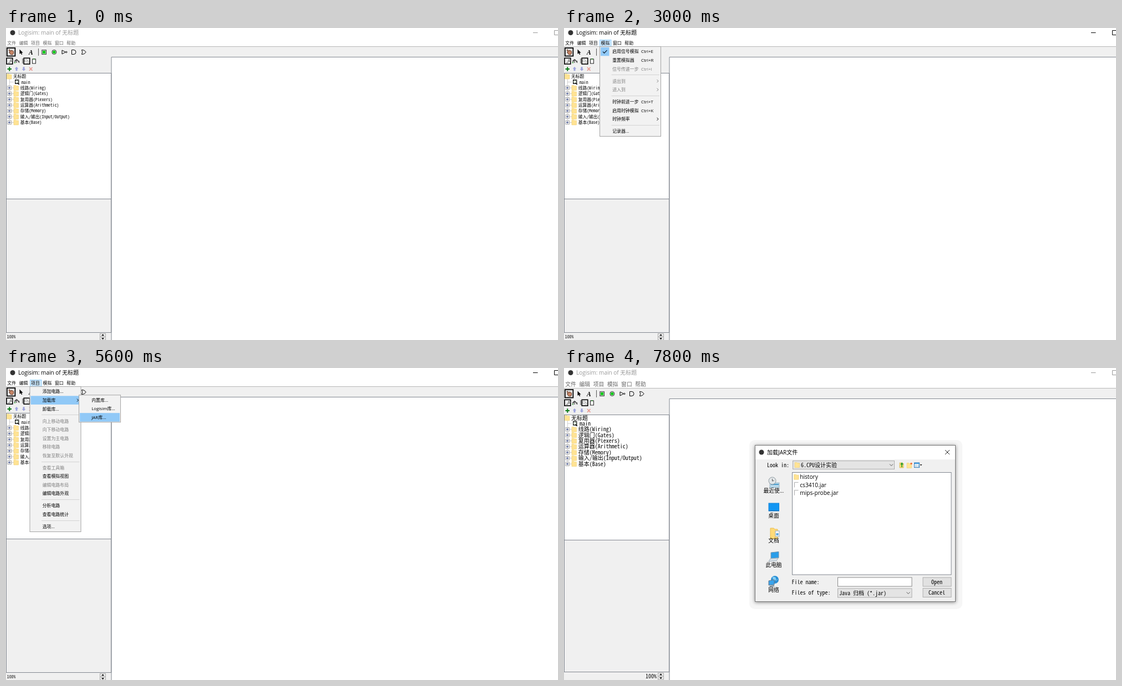
These frames come from a looping animation (995 by 563 pixels, 8000 ms). An HTML page:

```html
<!DOCTYPE html>
<html lang="zh-CN">
<head>
<meta charset="utf-8">
<title>Logisim</title>
<style>
  html, body { margin: 0; width: 100%; height: 100%; overflow: hidden; background: #fff; }
  svg { display: block; width: 100vw; height: 100vh; }
  text { font-family: 'Open Sans', 'Noto Sans CJK SC', 'Noto Sans CJK', sans-serif; white-space: pre; }
  .mono { font-family: 'Noto Sans Mono CJK SC', 'Noto Sans CJK SC', 'Noto Sans CJK', monospace; }
</style>
</head>
<body>
<svg id="stage" viewBox="0 0 995 563" preserveAspectRatio="none"></svg>
<script>
const stage = document.getElementById('stage');
const LOOP = 8000, BLUE = '#91c9f7', FACE = '#f0f0f0', EDGE = '#828790';

// Drawing helpers; text is placed by its vertical centre
const rect = (x, y, w, h, fill, stroke = 'none', more = '') =>
  `<rect x="${x}" y="${y}" width="${w}" height="${h}" fill="${fill}" stroke="${stroke}" ${more}/>`;
const path = (d, stroke = '#000', fill = 'none', width = 1) =>
  `<path d="${d}" stroke="${stroke}" fill="${fill}" stroke-width="${width}"/>`;
const disc = (x, y, r, fill, stroke = 'none') =>
  `<circle cx="${x}" cy="${y}" r="${r}" fill="${fill}" stroke="${stroke}"/>`;
const text = (x, y, str, size, fill = '#000', more = '') =>
  `<text x="${x}" y="${y + size * 0.36}" font-size="${size}" fill="${fill}" ${more}>${str}</text>`;
const mono = (x, y, str, size, more = '') => text(x, y, str, size, '#000', 'class="mono" ' + more);
const group = (transform, body, more = '') => `<g transform="${transform}" ${more}>${body}</g>`;
const folder = (x, y) =>
  path(`M${x} ${y - 4.5}h4l1 1h3.5v8h-8.5z`, '#efcf70', '#ffe394', 0.6);

// Menu entries: '-' separator, leading '!' disabled, trailing '>' submenu, '|' shortcut
const MENUS = {
  simulate: { x: 64.5, y: 33.5, w: 110, keys: 139, mark: 'check', items:
    ['启用信号模拟|Ctrl+E', '重置模拟器|Ctrl+R', '!信号传递一步|Ctrl+I', '-', '!退出到>', '!进入到>', '-',
     '时钟前进一步|Ctrl+T', '启用时钟模拟|Ctrl+K', '时钟频率>', '-', '记录器...'] },
  window: { x: 85.5, y: 33.5, w: 149, keys: 201, mark: 'dot', items:
    ['最小化|Ctrl+M', '最大化', '关闭|Ctrl+W', '-', 'Combinational Analysis', '偏好', '-', '无标题'] },
  project: { x: 43, y: 33.5, w: 92, items:
    ['添加电路...', '加载库>', '卸载库...', '-', '!向上移动电路', '!向下移动电路', '!设置为主电路', '!移除电路',
     '!恢复至默认外观', '-', '!查看工具箱', '查看模拟视图', '!编辑电路布局', '编辑电路外观', '-',
     '分析电路', '查看电路统计', '-', '选项...'] },
  library: { x: 131.5, y: 48.8, w: 75, items: ['内置库...', 'Logisim库...', 'JAR库...'] }
};
const BAR = ['文件', '编辑', '项目', '模拟', '窗口', '帮助'];
const BAR_INDEX = { project: 2, simulate: 3, window: 4 };

// State changes: start time, then properties
const STATES = [
  [0, {}],
  [1200, { menu: 'simulate' }],
  [1800, { menu: 'simulate', hover: 1 }],
  [2000, { menu: 'simulate' }],
  [2200, { menu: 'window' }],
  [3000, { menu: 'simulate' }],
  [3200, { menu: 'project' }],
  [3800, { menu: 'project', hover: 1 }],
  [4000, { menu: 'project', hover: 1, sub: true }],
  [4400, { menu: 'project' }],
  [4800, { menu: 'project', hover: 1 }],
  [5000, { menu: 'project', hover: 1, sub: true, subHover: 0 }],
  [5400, { menu: 'project', hover: 1, sub: true, subHover: 1 }],
  [5600, { menu: 'project', hover: 1, sub: true, subHover: 2 }],
  [7000, { dialog: true, scale: 0.98, halo: 0.98, alpha: 0.55 }],
  [7200, { dialog: true, scale: 1, halo: 0.98, alpha: 1 }],
  [7600, { dialog: true, scale: 1, halo: 1, alpha: 1, bigMain: true }],
  [7800, { dialog: true, scale: 1, halo: 1, alpha: 1, bigMain: true, bigDialog: true }]
];

function drawMenu(name, hover) {
  const { x, y, w, keys, mark, items } = MENUS[name];
  const ROW = 15.55, GAP = 6.45;
  let top = y + 1.3, out = '', last = top;
  items.forEach((item, i) => {
    if (item === '-') {
      out += path(`M${x + 21} ${Math.round(top + 3)}.5H${x + w - 2.5}`, '#d4d4d4');
      top += GAP;
      return;
    }
    const mid = top + ROW / 2;
    const color = item[0] === '!' ? '#808080' : '#000';
    const [label, key] = item.replace(/[!>]/g, '').split('|');
    if (i === hover) out += rect(x + 1.5, top, w - 3, ROW, BLUE);
    out += text(x + 22.7, mid, label, 7.9, color);
    if (key) out += text(keys, mid, key, 7.9, color);
    if (item.endsWith('>')) out += path(`M${x + w - 7} ${mid - 2.5}l2.5 2.5l-2.5 2.5`, color);
    if (mark === 'check' && i === 0)
      out += rect(x + 1.5, top, 15.5, ROW, BLUE) + path(`M${x + 5.5} ${mid}l2.5 2.7l5-5.2`, '#123', 'none', 1.2);
    if (mark === 'dot' && i === items.length - 1)
      out += rect(x + 2, top, 15.5, ROW, BLUE) + disc(x + 9.7, mid, 2.4, '#123');
    last = top += ROW;
  });
  return rect(x, y, w, Math.round(last - y + 1.2), '#f2f2f2', '#a5a5a5') + out;
}

function drawTitle(active) {
  const color = active ? '#000' : '#999';
  return rect(0, 0, 995, 37, '#fff') + disc(12, 8.5, 4.5, '#333') +
    text(22, 8.5, 'Logisim: main of 无标题', 10, color) +
    path('M950 8.5h8.5M988.5 4.5h8v8h-8z', color);
}

function drawBar(active, menu, big) {
  const step = big ? 25.2 : 21.4, open = BAR_INDEX[menu];
  let out = '';
  if (open) out += rect(Math.round(open * step) + 0.5, 21.5, 20.5, 12, '#cce8ff', '#99d1ff');
  BAR.forEach((label, i) => {
    out += text(2.3 + i * step, big ? 29 : 27, label, big ? 9.8 : 7.9, active ? '#000' : '#666');
  });
  return out;
}

function drawToolbar() {
  const ink = '#000';
  const wrench = 'M3.5 64l4-4q-1-3 2.5-4l-1 2l1 1l2-.7q-.5 3-3.5 2.5l-4 4z';
  return rect(1.8, 36, 14.6, 14.6, '#e4e4e4', ink, 'stroke-width="1.8"') +
    path('M5 39.5l1.4-.6l2.6 3l.3-1.7l1.3.2l.6.4l1.2.3l1.2 1.2v3.4l-1.5 2.2h-3.4l-3.2-4.2l1.7-.2z', '#59301e', '#c98768', 0.9) +
    path('M24.5 38.5v8.5l2-1.8l1.5 3l1.3-.7l-1.4-2.8h2.7z', 'none', ink) +
    text(41, 43.5, 'A', 11.5, ink, 'style="font:italic bold 11.5px \'Liberation Serif\',serif"') +
    path('M58.5 37v13', '#555') +
    rect(64.8, 39.8, 7.6, 7.6, '#fff', '#222') + rect(66, 41, 5.2, 5.2, '#10c818') +
    disc(86.8, 43.5, 4, '#fff', '#222') + disc(86.8, 43.5, 2.8, '#10c818') +
    path('M101 40v7l6.5-3.5z') + disc(108.8, 43.5, 1.2, '#fff', ink) +
    path('M118.5 39.5h3.5a4 4 0 0 1 0 8h-3.5z') +
    path('M136.5 39.5q5-.2 7.5 4q-2.5 4.2-7.5 4q2.5-4 0-8z') +
    rect(1, 54.3, 10.8, 10.8, '#eee', ink, 'stroke-width="1.6"') + path(wrench, '#666', '#bbb', 0.6) +
    path('M15 63l3-5h3l3 5M15 60l4-3.5l3 2.5M19 58v5', '#222') +
    disc(16, 62.5, 1.2, '#5a5') + disc(23, 60.5, 1.4, '#555') +
    path('M30 55v9', '#444') +
    rect(32.2, 54.3, 10.6, 10.8, '#eee', ink, 'stroke-width="1.6"') +
    path('M34 57h2.5a2 2 0 0 1 0 4h-2.5zM38.5 59q2 0 2.5 2t-2.5 2', '#aaa') +
    rect(47.5, 56, 6, 8, '#fff', '#222') + path('M49 56h3', '#080') +
    path('M2.5 74h7.5M6.3 70.3v7.5', '#087a16', 'none', 2) +
    path('M19 70l3.3 3.6h-1.8v3.7h-3v-3.7h-1.8z', 'none', '#9da3df') +
    path('M32 77.5l3.3-3.6h-1.8v-3.7h-3v3.7h-1.8z', 'none', '#9da3df') +
    path('M42 71l5.5 5.8M47.5 71l-5.5 5.8', '#e99b93', 'none', 1.7);
}

function drawTree(size) {
  const rows = ['线路(Wiring)', '逻辑门(Gates)', '复用器(Plexers)', '运算器(Arithmetic)',
    '存储(Memory)', '输入/输出(Input/Output)', '基本(Base)'];
  let out = path('M6.5 92v78M6 97.5h8', '#c4c4c4', 'none', 0.8) +
    folder(1.5, 87.5) + mono(13, 87.5, '无标题', size) +
    rect(16.5, 93.5, 6.5, 7, '#fff', '#222') + disc(19.5, 97, 3, '#eafaea', '#222') +
    path('M21 99.5l2.7 2.5', '#000', 'none', 1.6) + mono(28, 98, 'main', size);
  rows.forEach((label, i) => {
    const y = 108 + i * 10.4;
    out += path(`M10 ${y}h4`, '#c4c4c4') + rect(2.8, y - 3.3, 6.6, 6.6, '#f8f8f8', '#919191', 'stroke-width=".8"') +
      path(`M4 ${y}h4.2M6.1 ${y - 2.1}v4.2`, '#3b4b87') + folder(14, y) + mono(25.7, y, label, size);
  });
  return out;
}

function drawMain(s) {
  const big = s.bigMain, active = !!s.menu, dy = big ? 3 : 0, size = big ? 10 : 7.75;
  const split = big ? 310.5 : 308.5, foot = big ? 548.5 : 549.5;
  return rect(0, 0, 995, 563, '#fff') + drawTitle(active) +
    rect(0, 33.5 + dy, 995, 19 + dy / 10, FACE) + rect(0, 52 + dy, 190, 511, FACE) +
    path(`M0 ${33.5 + dy}H995`, '#b8b8b8') + path(`M190 ${52.5 + dy}H995M190 ${52.5 + dy}V563`, EDGE) +
    drawBar(active, s.menu, big) + group(`translate(0 ${dy})`, drawToolbar()) +
    rect(0.5, 81.5 + dy, 189, split - 81.5 - dy, '#fff', EDGE) +
    group(`translate(0 ${big ? 2.7 : 0})`, drawTree(size)) +
    path(`M0 ${split}H190`, '#666b73') + rect(0.5, split, 189, foot - split, FACE, EDGE) +
    mono(big ? 147 : 1.8, foot + 8, '100%', size) +
    rect(169.5, foot + 2, 10, 11.5, FACE, '#999', 'stroke-width=".8"') +
    path(`M169.5 ${foot + 7.7}h10`, '#999') +
    path(`M171.8 ${foot + 5.8}l2.7-2.7l2.7 2.7zM171.8 ${foot + 9.8}l2.7 2.7l2.7-2.7z`, 'none', '#000');
}

function sideIcons() {
  const sheet = (x, y) => rect(x, y, 7, 10, '#f8fbff', '#9ab') + rect(x + 1.5, y + 4, 4, 4, '#5ba8e2');
  return rect(371, 207, 17, 9, '#b8d8ea', '#8ba7b8', 'stroke-width=".7"') + path('M373 210h14', '#4c9ccc', 'none', 2) +
    disc(375.5, 203.5, 6.5, '#e2e6e8', '#909ca3') + path('M375.5 200v4l3-1', '#555') +
    rect(369, 244, 18.5, 14, '#1296f3', '#1685d7') + path('M369 257.5h18.5', '#0b67b4') +
    path('M372 289h6l2 2h5v17h-13z', '#e7bd52', '#ffda78') + sheet(381, 294) +
    path('M373 333l14-1.5v11l-14 1z', '#7796ad', '#299de9') + path('M372 344l14-1l-3 5l-14 1z', '#a5b3bd', '#d7e0e7') +
    disc(380, 382, 7, '#298fd6') + path('M376 377l5 1l1 4l-4 2zM382 384l3-3', '#85cef3', '#85cef3') +
    path('M369 384l10-2v9l-10 1z', '#678', '#3aa4ec') + path('M371 394l8-1', '#78909e', 'none', 2);
}

function drawDialog(s) {
  const big = s.bigDialog, size = big ? 10 : 7.7, fileSize = big ? 10.1 : 8.2;
  const middle = 'text-anchor="middle"';
  const fieldX = big ? 493.5 : 475.5, fieldW = 627 - fieldX;
  const rowA = big ? 386 : 388.5, rowB = big ? 406 : 407;
  const height = big ? 16 : 13.5;
  const box = (x, y, w, h, fill, stroke = '#adadad') => rect(x, y, w, h, fill, stroke);
  const chevron = (x, y) => path(`M${x - 3} ${y - 1.5}l3 3l3-3`, '#555');
  const button = (label, y, stroke) =>
    box(647, y - height / 2, 51, height, '#e1e1e1', stroke) + mono(672, y, label, size, middle);

  let out = rect(344.5, 139.5, 361, 282, FACE, '#777', 'style="filter:drop-shadow(0 1px 3px #0007)"') +
    rect(345, 140, 360, 25, '#fff') + disc(356, 152, 4.5, '#333') +
    text(366, 152, '加载JAR文件', 10) + path('M687 148l8 8M695 148l-8 8', '#222') +
    mono(406, 175, 'Look in:', size, 'text-anchor="end"') +
    box(412.5, 167.5, 183, 15, '#e4e4e4') + folder(416, 175) +
    mono(427, 175, '6.CPU设计实验', size) + chevron(590, 175) +
    path('M605 171h4l1 1h2v8h-7z', '#d2ac41', '#ffdc76', 0.7) + path('M609 179v-7l-2 2m2-2l2 2', '#189b28', 'none', 1.6) +
    folder(618, 176) + disc(626, 172.5, 1.7, '#f26b32') +
    rect(631.5, 171, 9, 8.5, '#fff', '#2676b5') + path('M632 172h8.5', '#3794d9', 'none', 2) +
    path('M633.5 175h2m2 0h2m-6 2.5h2m2 0h2', '#367fae') + path('M641.5 174h4l-2 2.2z', 'none', '#111') +
    box(411.5, 188.5, 286.5, big ? 184.5 : 188, '#fff', EDGE);

  ['history', 'cs3410.jar', 'mips-probe.jar'].forEach((name, i) => {
    const y = (big ? 196.7 : 194.2) + i * (big ? 14.2 : 12.2);
    out += i ? path(`M415.5 ${y + 4.5}v-9h7`, '#999', '#fff', 0.8) : folder(414.5, y);
    out += text(425.3, y, name, fileSize);
  });
  out += sideIcons();
  [big ? '最近使...' : '最近使用...', '桌面', '文档', '此电脑', '网络'].forEach((label, i) => {
    out += text(378, 222 + i * 44.6, label, big ? 9.7 : 8.2, '#000', middle);
  });
  out += mono(410.5, rowA, 'File name:', size) + mono(410.5, rowB - 0.5, 'Files of type:', size) +
    box(fieldX, rowA - height / 2, fieldW, height, '#fff', '#8a8a8a') +
    box(fieldX, rowB - height / 2, fieldW, height, '#e4e4e4') +
    mono(fieldX + 2.5, rowB, 'Java 归档 (*.jar)', size) + chevron(620.5, rowB) +
    button('Open', rowA, big ? '#adadad' : '#0078d7') + button('Cancel', rowB - 0.5);

  const zoom = k => `translate(525 280) scale(${k}) translate(-525 -280)`;
  return group(zoom(s.halo), rect(334, 130, 384, 305, '#f6f6f6', 'none', 'rx="10"'), `opacity="${s.alpha}"`) +
    group(zoom(s.scale), out, `opacity="${s.alpha}"`);
}

function draw(s) {
  let out = drawMain(s);
  if (s.menu) out += drawMenu(s.menu, s.hover);
  if (s.sub) out += drawMenu('library', s.subHover);
  if (s.dialog) out += drawDialog(s);
  stage.innerHTML = out;
}

let shown;
function tick() {
  const time = performance.now() % LOOP;
  const state = STATES.findLast(([start]) => start <= time)[1];
  if (state !== shown) draw(shown = state);
  requestAnimationFrame(tick);
}
tick();
</script>
</body>
</html>
```
